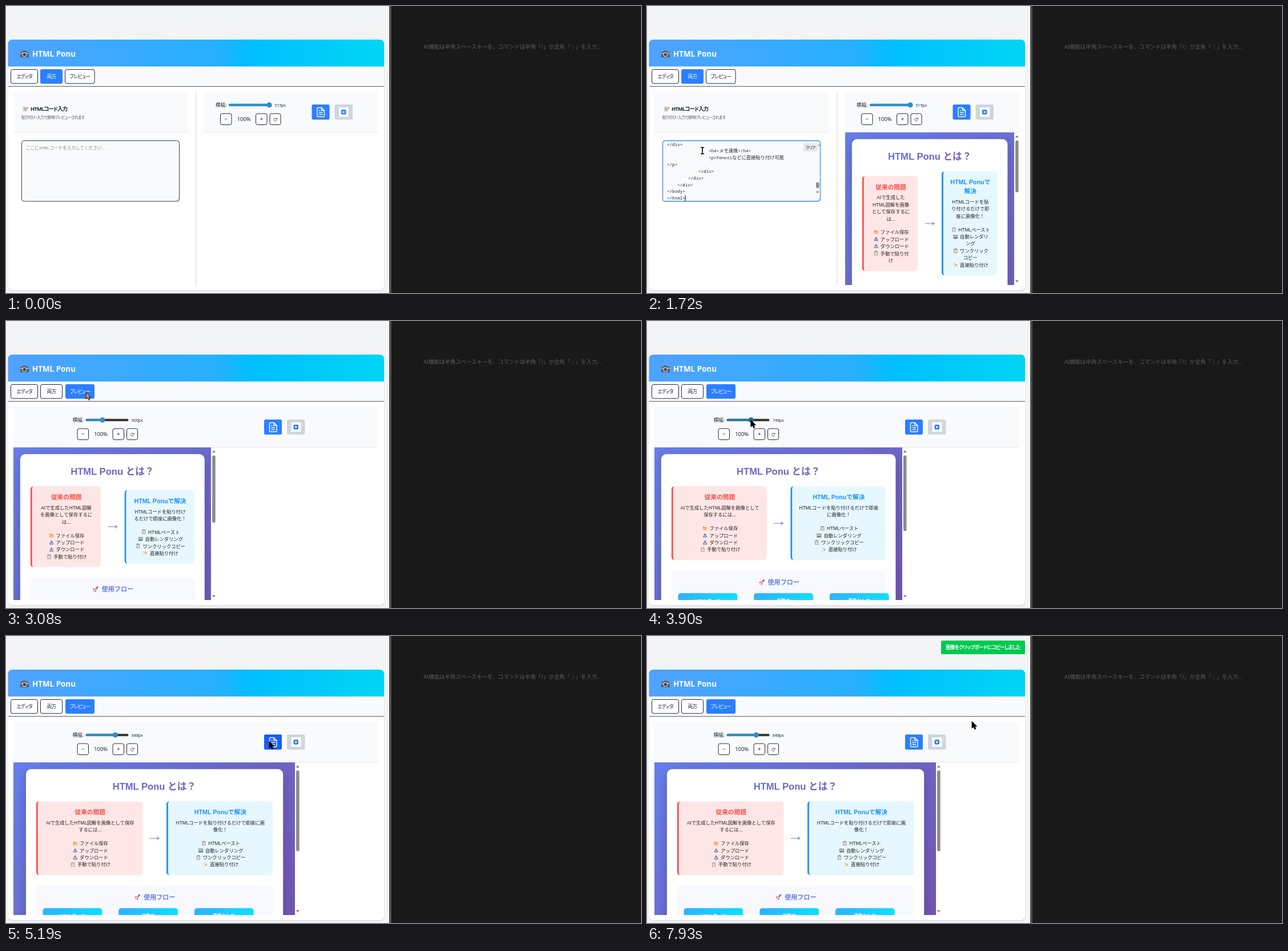
An HTML page for the animation above (8 s loop, 1112x504 px).

```html
<!DOCTYPE html>
<html lang="ja">
<head>
<meta charset="utf-8">
<title>HTML Ponu</title>
<style>
html, body { margin: 0; width: 100%; height: 100%; overflow: hidden; background: #f3f4f6; }
.layer { position: absolute; left: 0; top: 0; width: 1112px; height: 504px; }
text { font-family: 'Noto Sans', 'Noto Sans CJK JP', sans-serif; white-space: pre; }
.kana { font-feature-settings: 'palt'; letter-spacing: -.09em; }
.code { font-family: 'Noto Sans Mono', 'Noto Sans CJK JP', monospace; }
.code .cjk { font-size: 8.28px; }
#view { position: absolute; top: 222px; height: 268px; overflow: hidden; }
#page {
  transform: scale(.5925); transform-origin: 0 0; overflow: hidden; box-sizing: border-box; padding: 20px;
  background: linear-gradient(135deg, #667eea, #764ba2);
  font: 14px/21px 'Liberation Sans', 'Noto Sans CJK JP', sans-serif; color: #222; text-align: center;
}
#page * { margin: 0; }
#page .box { max-width: 700px; margin: 0 auto; padding: 30px; background: #fff; border-radius: 15px; height: 1200px; box-shadow: 0 10px 30px #0003; }
h1 { font-size: 28px; line-height: 43px; background: linear-gradient(135deg, #667eea, #764ba2); -webkit-background-clip: text; background-clip: text; color: transparent; }
#page .row { display: flex; align-items: center; gap: 20px; margin: 22px 0 31px; }
.card { flex: 1 1 0; min-width: 0; padding: 20px; border-left: 5px solid; border-radius: 10px; }
.card h3 { font-size: 18px; line-height: 27px; }
#page .card p { margin: 7px 0 19px; color: #222; }
.card div { color: #222; }
.bad { background: #ffe6e6; border-color: #fb4a44; color: #fb4a44; }
.good { background: #e6f7ff; border-color: #1890ff; color: #1890ff; }
.arrow { width: 30px; height: 14px; fill: none; stroke: #667eea; stroke-width: 1.7; }
.flow { position: relative; height: 300px; padding: 20px; box-sizing: border-box; background: #f8f9ff; border-radius: 10px; }
.flow h3 { font-size: 18.72px; line-height: 30px; color: #667eea; }
.step { position: absolute; top: 67px; width: 175px; height: 90px; padding-top: 12px; box-sizing: border-box; border-radius: 8px; background: linear-gradient(135deg, #2fb0ff, #00f2fe); color: #fff; font-weight: bold; font-size: 13px; }
.emo { width: 1em; height: 1em; padding: 0 .178em; vertical-align: -.12em; }
</style>
</head>
<body>
<svg width="0" height="0" style="position:absolute">
  <defs>
    <linearGradient id="head"><stop stop-color="#51a2ff"/><stop offset=".55" stop-color="#27b0ff"/><stop offset=".65" stop-color="#00bfff"/><stop offset="1" stop-color="#00d5f3"/></linearGradient>
    <symbol id="camera" viewBox="0 0 16 16"><path d="M0 4h4l1-2h6l1 2h4v10H0z" fill="#5c5f63"/><path d="M0 6h16v2H0z" fill="#a5a8ac"/><circle cx="8" cy="9" r="4" fill="#d5d8dc"/><circle cx="8" cy="9" r="2.8" fill="#345"/></symbol>
    <symbol id="memo" viewBox="0 0 16 16"><path d="M1 1h11v14H1z" fill="#d5dae0"/><path d="M3 4h7M3 7h7M3 10h5" stroke="#7a8794"/><path d="M6 13l1-3 7-7 2 2-7 7z" fill="#e79a3c"/><path d="M13 4l2-2 1 2-1 2z" fill="#e0565b"/></symbol>
    <symbol id="folder" viewBox="0 0 16 16"><path d="M1 2h5l2 2h7v10H1z" fill="#e79a45"/><path d="M1 6h14v8H1z" fill="#f7bd73"/></symbol>
    <symbol id="out" viewBox="0 0 16 16"><path d="M1 8h3l1 3h6l1-3h3v7H1z" fill="#8b99a8"/><path d="M8 1l5 5h-3v4H6V6H3z" fill="#3d7fd0"/></symbol>
    <symbol id="in" viewBox="0 0 16 16"><path d="M1 8h3l1 3h6l1-3h3v7H1z" fill="#8b99a8"/><path d="M8 10l5-5h-3V1H6v4H3z" fill="#3d7fd0"/></symbol>
    <symbol id="clip" viewBox="0 0 16 16"><path d="M2 1h12v15H2z" fill="#a9927f"/><path d="M4 3h8v11H4z" fill="#f1f3f6"/><path d="M5 6h6M5 9h6M5 12h4" stroke="#8c96a0"/><path d="M5 0h6v3H5z" fill="#77808a"/></symbol>
    <symbol id="pic" viewBox="0 0 16 16"><path d="M0 2h16v13H0z" fill="#8a6c4c"/><path d="M2 4h12v9H2z" fill="#a9d3f0"/><path d="M2 13l4-5 3 3 2-2 3 4z" fill="#4c7a55"/></symbol>
    <symbol id="spark" viewBox="0 0 16 16"><path d="M10 2l1.500 4.500L16 8l-4.500 1.500L10 14l-1.500-4.500L4 8l4.500-1.500zM4 0l1 2.500L7 3.500 5 4.500 4 7 3 4.500 1 3.500l2-1zM3.500 10l.8 2.200 2.200.8-2.200.8-.8 2.200-.8-2.200L.5 13l2.200-.8z" fill="#f3a24c"/></symbol>
    <symbol id="rocket" viewBox="0 0 16 16"><path d="M15 1Q9 1 5 8l3 3q7-4 7-10z" fill="#b9c1cc"/><path d="M15 1l-5 1 4 4zM6 6L2 7 1 10l4-1zM10 10l-1 4-3 1 1-4z" fill="#e0484f"/><circle cx="10.5" cy="5.5" r="1.6" fill="#3d6fb0"/><path d="M4 10l2 2-5 3z" fill="#f5a53d"/></symbol>
  </defs>
</svg>
<svg id="ui" class="layer"></svg>
<div id="view"><div id="page"></div></div>
<svg id="over" class="layer"></svg>
<script>
const $ = id => document.getElementById(id);
const INK = '#1e2939', BLUE = '#2b7fff', SCALE = .5925, LOOP = 8000;

// [time, x, y]
const POINTER = [[70, 950, 462], [400, 84, 262], [460, 97, 254], [2040, 97, 254], [2300, 330, 215], [2810, 140, 125],
  [3080, 140, 125], [3620, 169, 174], [3690, 171, 174], [4040, 189, 174], [4110, 190, 174], [4310, 190, 174], [4380, 191, 174],
  [4640, 191, 174], [5190, 461, 185], [5320, 461, 185], [5460, 511, 200], [5860, 511, 200], [6130, 507, 197], [6400, 513, 205],
  [6610, 513, 205], [6750, 581, 206], [6930, 581, 206], [7000, 489, 187], [7200, 462, 188], [7670, 462, 188], [7930, 569, 150]];
const WIDTH = [[2870, 600], [3640, 600], [4040, 827], [4110, 840], [4310, 840], [4380, 848]];
const HEIGHT = [[515, 1195], [600, 921], [827, 767]];

function at(keys, t) {
  if (t <= keys[0][0]) return keys[0].slice(1);
  const i = keys.findIndex(k => k[0] > t);
  if (i < 0) return keys[keys.length - 1].slice(1);
  const a = keys[i - 1], b = keys[i], u = (t - a[0]) / (b[0] - a[0]);
  return a.slice(1).map((v, n) => v + (b[n + 1] - v) * u);
}

const rect = (x, y, w, h, fill, r = 0, more = '') =>
  `<rect x="${x}" y="${y}" width="${w}" height="${h}" rx="${r}" fill="${fill}" ${more}/>`;
const path = (d, more) => `<path d="${d}" ${more}/>`;
// y is the middle of the line
const text = (s, x, y, size, fill = INK, more = '') =>
  `<text x="${x}" y="${y + size * .36}" font-size="${size}" fill="${fill}" ${more}>${s}</text>`;
const mid = 'text-anchor="middle"';
const icon = (id, x, y, s) => `<use href="#${id}" x="${x}" y="${y}" width="${s}" height="${s}"/>`;
const button = (x, y, w, h, on) => on ? rect(x - .5, y - .5, w + 1, h + 1, BLUE, 3) : rect(x, y, w, h, '#fff', 3, `stroke="${INK}"`);

const tab = (s, x, w, on) => button(x, 111.5, w, 24.5, on) +
  text(s, x + w / 2, 124, 8.8, on ? '#fff' : INK, mid + ' class="kana"');

function scrollbar(x, top, bottom, thumbY, thumbH, w) {
  return path(`M${x - 3} ${top + 2}h6l-3-4zM${x - 3} ${bottom - 2}h6l-3 4z`, 'fill="#858585"') +
    rect(x - w / 2, thumbY, w, thumbH, '#8b8b8b', w / 2);
}

function codeLines() {
  const cjk = s => `<tspan class="cjk">${s}</tspan>`;
  const lines = [['</div>', 35], ['<h4>|メモ連携|</h4>', 108], ['<p>Fenori|などに直接貼り付け可能|', 108], ['</p>', 35],
    ['</div>', 90], ['</div>', 72], ['</div>', 53], ['</body>', 35], ['</html>', 35]];
  return lines.map(([s, x], i) => {
    const parts = s.replace(/</g, '&lt;').split('|');
    return text(parts.map((p, n) => n % 2 ? cjk(p) : p).join(''), x, 242.8 + i * 11.85, 7.6, INK, 'class="code"');
  }).join('');
}

function editor(t) {
  const focus = t >= 850, pasted = t >= 1680;
  let s = rect(13, 151, 305, 71, '#f9fafb') + rect(13, 221.5, 305, 1, '#e5e7eb') + rect(332.5, 151, 1, 339, '#d1d5dc') +
    icon('memo', 29, 176, 10) + text('HTMLコード入力', 43, 180.5, 9.4, INK, 'font-weight="600" class="kana"') +
    text('貼り付け・入力で即時プレビューされます', 27, 195, 7, '#4a5565', 'class="kana"') +
    rect(27.5, 236.5, 276, 106.5, '#f9fafb', 4, `stroke="${focus ? '#3b8cf0' : '#364153'}" stroke-width="${focus ? 1.3 : 1}"`);
  if (pasted) {
    s += codeLines() + rect(274, 241, 25, 14.5, '#e5e7eb', 3) + text('クリア', 286.5, 248.3, 7, INK, mid + ' class="kana"') +
      path('M299.5 245.5h3l-1.5-3z', 'fill="#777"') + path('M296 325.500h5l-2.500 3.500z', 'fill="#777"') + rect(296, 309.5, 5.5, 10.5, '#8b8b8b', 2.7);
  } else s += text('ここにHTMLコードを入力してください...', 35, 249.5, 7.65, '#8a8a8a', 'class="code"');
  s += path('M298 342l5-5M301 342l2-2', 'stroke="#777" stroke-width=".6"');
  const since = t - (pasted ? 1680 : 850);
  if (focus && Math.floor(since / 530) % 2 == 0) s += pasted ? rect(66.5, 332.5, 1, 10, '#000') : rect(35, 244, 1, 10, '#000');
  return s;
}

function controls(full, width, hover, drag) {
  const thumb = full ? 169 + (width - 600) * .09 + 250.5 : 461;
  const fill = drag ? '#2a7c9c' : '#2d8fc4';
  const sign = (s, x) => button(x, 189, 19.5, 19.5) + text(s, x + 9.75, 198.5, 10, INK, mid);
  const left = full ? 13 : 347;
  return rect(left, 151, 651.5 - left, 71, '#f9fafb') + rect(left, 221.5, 651.5 - left, 1, '#e5e7eb') +
    `<g transform="translate(${full ? -250.5 : 0})">` +
    text('横幅:', 367, 173.5, 8.6) + rect(390, 171.7, 75, 4.4, full ? '#3f3b33' : fill, 2.2) +
    rect(390, 171.7, thumb - 390, 4.4, fill, 2.2) + `<circle cx="${thumb}" cy="173.800" r="4.600" fill="${drag ? '#2a6a9c' : '#2d8fc4'}"/>` +
    text(Math.round(width) + 'px', 470.5, 174.3, 6.9) +
    sign('−', 375.5) + text('100%', 416.7, 198.8, 9.4, INK, mid) + sign('+', 437.5) + button(462, 189, 19, 19.5) +
    path('M474 198.200a2.600 2.600 0 1 0 .1 2.400M474.600 196.600v2h-2', `fill="none" stroke="${INK}" stroke-width=".8"`) + '</g>' +
    `<g transform="translate(${full ? -83.5 : 0})">` + rect(535.5, 173, 31, 26.5, hover ? '#155dfc' : BLUE, 2.5) +
    path('M546.500 178.500h6l5 5v9.500q0 1.500-1.500 1.500h-9.500q-1.500 0-1.500-1.500v-13q0-1.500 1.500-1.500zM552.500 178.500v5h5M548 187h6.500M548 190.500h6.500M548 183.500h2',
      'fill="none" stroke="#fff" stroke-width="1.400"') +
    rect(575.5, 173, 31.5, 26.5, '#d1d5dc', 2.5) + rect(583, 178, 17, 16.5, '#fff', 1) + rect(587, 182, 8.5, 8.5, BLUE, 2) +
    '<circle cx="591.2" cy="186.2" r="1.7" fill="#fff"/></g>';
}

function pointer(t, x, y) {
  if (t < 70) return '';
  if (t < 2870 && x > 30 && x < 302 && y > 238 && y < 342)
    return path('M-3-5.500h6M-3 5.500h6M0-5.500v11', `transform="translate(${x} ${y})" stroke="#000" stroke-width="1.600"`);
  const onTab = x > 103 && x < 155 && y > 111 && y < 136;
  return path('M0 0v12l2.800-2.500 2 4.300 2.200-1-2-4.100h3.700z',
    `transform="translate(${x} ${y})" fill="${onTab ? '#d8924a' : '#000'}" stroke="#000" stroke-width=".8"`);
}

const emo = id => `<svg class="emo"><use href="#${id}"/></svg> `;
const card = (kind, title, body, items) =>
  `<div class="card ${kind}"><h3>${title}</h3><p>${body}</p>${items.map(([e, s]) => `<div>${emo(e)}${s}</div>`).join('')}</div>`;
$('page').innerHTML = '<div class="box"><h1>HTML Ponu とは\uFF1F</h1><div class="row">' +
  card('bad', '従来の問題', 'AIで生成したHTML図解を画像として保存するには...',
    [['folder', 'ファイル保存'], ['out', 'アップロード'], ['in', 'ダウンロード'], ['clip', '手動で貼り付け']]) +
  '<svg class="arrow"><path d="M1 7h28M22 2q2 4 7 5q-5 1-7 5"/></svg>' +
  card('good', 'HTML Ponuで解決', 'HTMLコードを貼り付けるだけで即座に画像化\uFF01',
    [['clip', 'HTMLペースト'], ['pic', '自動レンダリング'], ['clip', 'ワンクリックコピー'], ['spark', '直接貼り付け']]) +
  `</div><div class="flow"><h3>${emo('rocket')}使用フロー</h3>` +
  ['HTMLコード', '自動で', '画像として'].map((s, i) => `<div class="step" style="left:${20 + i * 224}px">${s}</div>`).join('') + '</div></div>';

const backdrop = rect(0, 0, 672, 504, '#f3f4f6') + rect(671, 0, 4, 504, '#4d4d4d') + rect(675, 0, 437, 504, '#191919') +
  text('AI機能は半角スペースキーを、コマンドは半角「/」か全角「\uFF1B」を入力...', 731, 72, 9.45, '#5c5c5c') +
  rect(3.5, 60, 659, 441, '#dfe1e5', 8) + rect(3.5, 59, 658.5, 440, '#fff', 8) +
  path('M3.500 106.500V67q0-8 8-8h642.500q8 0 8 8v39.500z', 'fill="url(#head)"') +
  icon('camera', 24.5, 76.5, 15.5) + text('HTML Ponu', 46, 84, 13.4, '#fff', 'font-weight="600"') +
  rect(4, 106.5, 658, 34.5, '#f9fafb') + rect(4, 140.7, 658, 1, '#4a4f57');

const shown = {};
function put(id, html) {
  if (shown[id] !== html) $(id).innerHTML = shown[id] = html;
}

function draw(t) {
  const full = t >= 2870, pasted = t >= 1680;
  const [x, y] = at(POINTER, t);
  const width = full ? at(WIDTH, t)[0] : 515;
  const height = at(HEIGHT, width)[0];
  const left = full ? 12.7 : 347, inner = (width - 15) * SCALE;
  const hover = full && x >= 452 && x <= 483 && y >= 173 && y <= 199;
  const drag = t >= 3640 && t < 4400;

  put('ui', backdrop + tab('エディタ', 8.5, 47) + tab('両方', 60.5, 38, !full) +
    tab('プレビュー', full ? 104.5 : 103.5, full ? 50 : 51.5, full) +
    (full ? '' : editor(t)) + controls(full, width, hover, drag) +
    (pasted ? scrollbar(left + inner + 4.6, 229, 483.5, 236, 241 * 452 / height, 5.6) : ''));

  const view = $('view').style, page = $('page').style;
  view.display = pasted ? 'block' : 'none';
  view.left = left + 'px';
  view.width = inner + 'px';
  page.width = width - 15 + 'px';
  page.height = height + 'px';

  const toast = t >= 7460 ? rect(515, 8, 147, 24, '#00c951', 2.5) +
    text('画像をクリップボードにコピーしました', 588.5, 20, 8.6, '#fff', mid + ' class="kana" font-weight="600"') : '';
  put('over', toast + pointer(t, x, y));
}

const start = performance.now();
function tick() {
  draw((performance.now() - start) % LOOP);
  requestAnimationFrame(tick);
}
tick();
</script>
</body>
</html>
```
